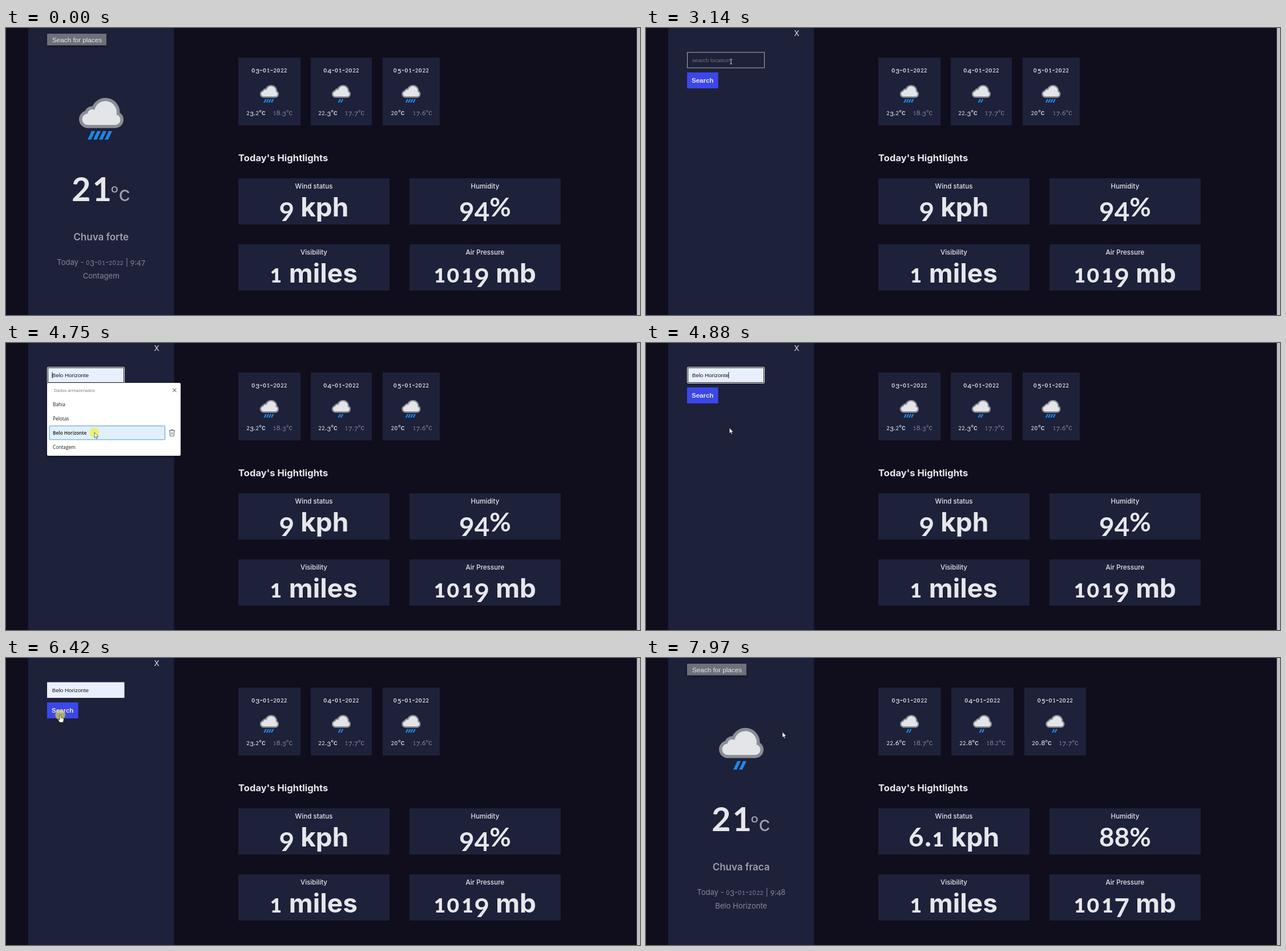
Recreate the animation shown at these times as an HTML page. Size 1111x504 px, loop 8 s.

```html
<!DOCTYPE html>
<html lang="en">
<head>
<meta charset="utf-8">
<title>Weather panel</title>
<style>
  html, body { margin: 0; width: 100%; height: 100%; overflow: hidden; background: #100e1d; }
  svg { display: block; width: 100%; height: 100%; }
  text { font-family: Inter, sans-serif; white-space: pre; }
  .figure { font-family: Lato, sans-serif; }
  .ui { font-family: "Liberation Sans", Arial, sans-serif; }
  .menu { font-family: "Open Sans", "Noto Sans", sans-serif; }
  .soft { filter: drop-shadow(0 2px 2px rgba(0, 0, 0, .45)); }
</style>
</head>
<body>
<svg viewBox="0 0 1111 504">
  <g id="scene"></g>
  <g id="pointer"></g>
</svg>
<script>
const LOOP = 8000;
const WHITE = '#e7e7eb', GREY = '#a09fb1', DIM = '#88869d', PANEL = '#1e213a';
const PLACES = ['Bahia', 'Pelotas', 'Belo Horizonte', 'Contagem'];

const T = {
  open: 2520, focus: 3340, menu: 3410, pick: 4820,
  caretOff: 5360, caretOn: 5890, blur: 6420, close: 6550, update: 6880
};
const CLICKS = [[2250, T.open], [T.focus, T.menu], [4750, T.pick], [T.blur, T.close]];

// time, x, y of the pointer's hot spot
const PATH = [
  [440, 990, 492], [600, 800, 385], [750, 590, 290], [1000, 250, 185],
  [1220, 119, 156], [1290, 120, 153], [1500, 136, 68], [1780, 153, 13],
  [1980, 153, 13], [2320, 155, 26], [2520, 155, 26], [2800, 158, 44],
  [3140, 149, 59], [3340, 149, 59], [3700, 152, 90], [4080, 156, 138],
  [4150, 156, 140], [4420, 155, 157], [4820, 155, 157], [5020, 126, 131],
  [5360, 97, 104], [5560, 97, 104], [5690, 95, 100], [6880, 95, 100],
  [7250, 125, 115], [7630, 190, 122], [7970, 239, 130]
];

const REPORTS = [
  {
    sky: 'Chuva forte', drops: 4, time: '9:47', city: 'Contagem',
    values: ['9 kph', '94%', '1 miles', '1019 mb'],
    days: [[407, 109, '23.2', '18.3', 4], [534, 107, '22.3', '17.7', 2], [660, 100, '20', '17.6', 4]]
  },
  {
    sky: 'Chuva fraca', drops: 2, time: '9:48', city: 'Belo Horizonte',
    values: ['6.1 kph', '88%', '1 miles', '1017 mb'],
    days: [[407, 109.5, '22.6', '18.7', 2], [535, 109, '22.8', '18.2', 2], [663, 108, '20.8', '17.7', 2]]
  }
];

const rect = (x, y, w, h, fill, more = '') =>
  `<rect x="${x}" y="${y}" width="${w}" height="${h}" fill="${fill}" ${more}/>`;

const text = (x, y, size, fill, content, more = '') =>
  `<text x="${x}" y="${y}" font-size="${size}" fill="${fill}" ${more}>${content}</text>`;

// Old-style figures: 0 1 2 sit at x-height, 3 4 5 7 9 hang below the baseline.
function figures(string, size) {
  let drop = 0;
  return [...string].map(c => {
    const want = '34579'.includes(c) ? size * .18 : 0;
    const dy = want - drop;
    drop = want;
    const face = /[1-9%º]/.test(c) ? 'class="figure"' : '';
    if (!face && !dy && c !== '0') return c;
    const gap = c === '0' ? size * .08 : size * .04;
    const small = '012'.includes(c) ? `font-size="${size * .75}" letter-spacing="${gap}"` : '';
    const heavy = size > 40 && '12'.includes(c) ? 'font-weight="bolder"' : '';
    return `<tspan dy="${dy}" ${face} ${small} ${heavy}>${c}</tspan>`;
  }).join('');
}

const label = (x, y, size, fill, string, more = '') =>
  text(x, y, size, fill, figures(string, size), 'text-anchor="middle" ' + more);

function cloud(x, y, scale, drops) {
  const rain = Array.from({ length: drops }, (_, i) =>
    `<path d="M${-17 + 10 * (i + (4 - drops) / 2)} 57.5h6l-7 15h-6z" fill="#1e88e5"/>`).join('');
  return `<g transform="translate(${x} ${y}) scale(${scale})">
    <path d="M-23 46.8A10 10 0 0 1-24 26.8A8 8 0 0 1-12 20.5A19.6 19.6 0 0 1 26.5 28.5A9.3 9.3 0 0 1 24.5 46.8Z"
      fill="#e4e5e8" stroke="#8b8e92" stroke-width="11" stroke-linejoin="round" paint-order="stroke"/>${rain}</g>`;
}

function dashboard(report) {
  const days = report.days.map(([x, w, high, low, drops], i) => {
    const mid = x + w / 2;
    return rect(x, 52, w, 119, PANEL) + cloud(mid, 100.2, .425, drops) +
      label(mid, 77.5, 12.2, WHITE, `0${i + 3}-01-2022`, 'font-weight="600"') +
      label(mid - 23.3, 153, 11.8, WHITE, high + 'ºc', 'font-weight="500"') +
      label(mid + (w < 105 ? 20 : 23.7), 153, 11.8, DIM, low + 'ºc');
  }).join('');
  const titles = ['Wind status', 'Humidity', 'Visibility', 'Air Pressure'];
  const boxes = titles.map((title, i) => {
    const x = 407 + 300 * (i % 2), y = i < 2 ? 264 : 380, mid = x + 132.5;
    return rect(x, y, 265, 81, PANEL) +
      label(mid, y + 18, 11.6, WHITE, title, 'font-weight="500"') +
      label(mid, y + 67, 46, WHITE, report.values[i], 'font-weight="700"');
  }).join('');
  return days + text(407, 234, 16.6, WHITE, "Today's Hightlights", 'font-weight="700"') + boxes;
}

function sidebar(report) {
  return rect(72, 10, 104, 20.5, '#6e707a', 'class="soft"') +
    text(81, 24.5, 11.7, WHITE, 'Seach for places', 'class="ui"') +
    cloud(167, 123.5, 1, report.drops) +
    text(115, 304, 77, WHITE, figures('21', 77), 'font-weight="500"') +
    text(183, 304, 36, GREY, figures('ºc', 36)) +
    label(166.7, 373, 17, GREY, report.sky, 'font-weight="600"') +
    label(166.7, 416, 13, DIM, `Today - 03-01-2022 | ${report.time}`) +
    label(166.7, 440, 13.1, DIM, report.city);
}

function menu(hover) {
  const items = PLACES.map((place, i) => {
    const y = 108.3 + 24.8 * i, on = i === hover;
    const mark = on ? rect(76, y - 12.3, 202.5, 24.2, '#e1effa', 'stroke="#4c9cdb" rx="1"') +
      `<path transform="translate(291 ${y - 6})" d="M-5.5 2H5.5M-2 2V.3H2V2M-4.2 2L-3.4 11.5H3.4L4.2 2M-1.3 4.5V9M1.3 4.5V9"
        fill="none" stroke="#555" stroke-width=".9"/>` : '';
    return mark + text(82, y + 3, 8.3, '#1b1b1b', place, `class="menu" font-weight="${on ? 600 : 400}"`);
  }).join('');
  return rect(72, 70, 234, 128, '#fff', 'rx="2" class="soft"') +
    text(84, 86, 7.5, '#707070', 'Dados armazenados', 'class="menu"') +
    '<path d="M292 79.7l6.5 6.5m0-6.5l-6.5 6.5" stroke="#333" stroke-width="1"/>' + items;
}

function searchPanel({ focused, entry, caret, menuOpen, hover }) {
  const fill = entry ? '#e8f0fe' : PANEL;
  const field = focused
    ? rect(72.5, 42.5, 135, 28, '#101010', 'stroke="#fff" rx="1.5"') + rect(74, 44, 132, 25, fill)
    : entry ? rect(72, 42.5, 135.5, 27.5, fill)
    : rect(72.5, 42.8, 135, 27.2, fill, 'stroke="#cfcfd6" stroke-width=".8"');
  return text(264, 14, 13.5, WHITE, 'X', 'text-anchor="middle"') + field +
    text(80.7, 59.7, 9.8, entry ? '#16161c' : '#757575', entry || 'search location', 'class="ui"') +
    (caret ? rect(caret, 51, .9, 11, entry ? '#111' : WHITE) : '') +
    rect(72, 78, 54.5, 28, '#3c47e9') +
    text(80, 95.5, 11.5, WHITE, 'Search', 'class="ui" font-weight="700"') +
    (menuOpen ? menu(hover) : '');
}

const POINTERS = {
  arrow: '<path d="M0 0V9.6L2.2 7.7L3.8 11.2L5.3 10.5L3.8 7.1H6.8Z" fill="#fff" stroke="#111" stroke-width=".6"/>',
  hand: `<path d="M-.9 .8Q.2-.7 1.2.8V5L5 6Q6.5 6.4 6.2 8.2L5.2 13H-.8L-3.8 8.8Q-3.4 7.2-.9 8.8Z"
    fill="#fff" stroke="#111" stroke-width=".6"/>`,
  beam: '<path d="M-2-4.3Q0-4.3 0-3V3Q0 4.3-2 4.3M2-4.3Q0-4.3 0-3M0 3Q0 4.3 2 4.3" fill="none" stroke="#e8e8e8" stroke-width=".9"/>'
};

function position(t) {
  if (t < PATH[0][0]) return null;
  const next = PATH.findIndex(p => p[0] > t);
  if (next < 0) return PATH.at(-1).slice(1);
  const [t0, x0, y0] = PATH[next - 1], [t1, x1, y1] = PATH[next];
  const k = (t - t0) / (t1 - t0);
  return [x0 + (x1 - x0) * k, y0 + (y1 - y0) * k];
}

const within = (v, from, to) => v >= from && v < to;

function stateAt(t, spot) {
  const menuOpen = within(t, T.menu, T.pick);
  const row = menuOpen ? Math.floor((spot[1] - 96) / 24.8) : -1;
  const hover = within(row, 0, PLACES.length) ? row : -1;
  const focused = within(t, T.focus, T.blur);
  const blinkedOff = within(t, T.caretOff, T.caretOn);
  return {
    panel: within(t, T.open, T.close), report: t < T.update ? 0 : 1,
    focused, menuOpen, hover,
    entry: t >= T.pick ? PLACES[2] : PLACES[hover] || '',
    caret: focused && !blinkedOff ? (t >= T.pick ? 144.4 : 80.6) : 0
  };
}

function pointerKind([x, y], { panel, menuOpen }) {
  if (!panel) return within(x, 72, 176) && within(y, 10, 31) ? 'hand' : 'arrow';
  if (within(x, 72, 207) && within(y, 43, 70)) return 'beam';
  return !menuOpen && within(x, 72, 126) && within(y, 78, 106) ? 'hand' : 'arrow';
}

const scene = document.getElementById('scene');
const pointer = document.getElementById('pointer');
let shown = '';

function draw(now) {
  const t = now % LOOP, spot = position(t), state = stateAt(t, spot);
  const key = JSON.stringify(state);
  if (key !== shown) {
    shown = key;
    const report = REPORTS[state.report];
    scene.innerHTML = rect(0, 0, 1111, 504, '#100e1d') + rect(39, 0, 255.5, 504, PANEL) +
      rect(1105.5, 0, 5.5, 504, '#c1c1c5') + dashboard(report) +
      (state.panel ? searchPanel(state) : sidebar(report));
  }
  const pressed = CLICKS.some(([from, to]) => within(t, from, to));
  pointer.innerHTML = spot
    ? `<g transform="translate(${spot})">${pressed ? '<circle r="8.8" fill="#f2ee28" fill-opacity=".6"/>' : ''}
       ${POINTERS[pointerKind(spot, state)]}</g>` : '';
  requestAnimationFrame(draw);
}
requestAnimationFrame(draw);
</script>
</body>
</html>
```
